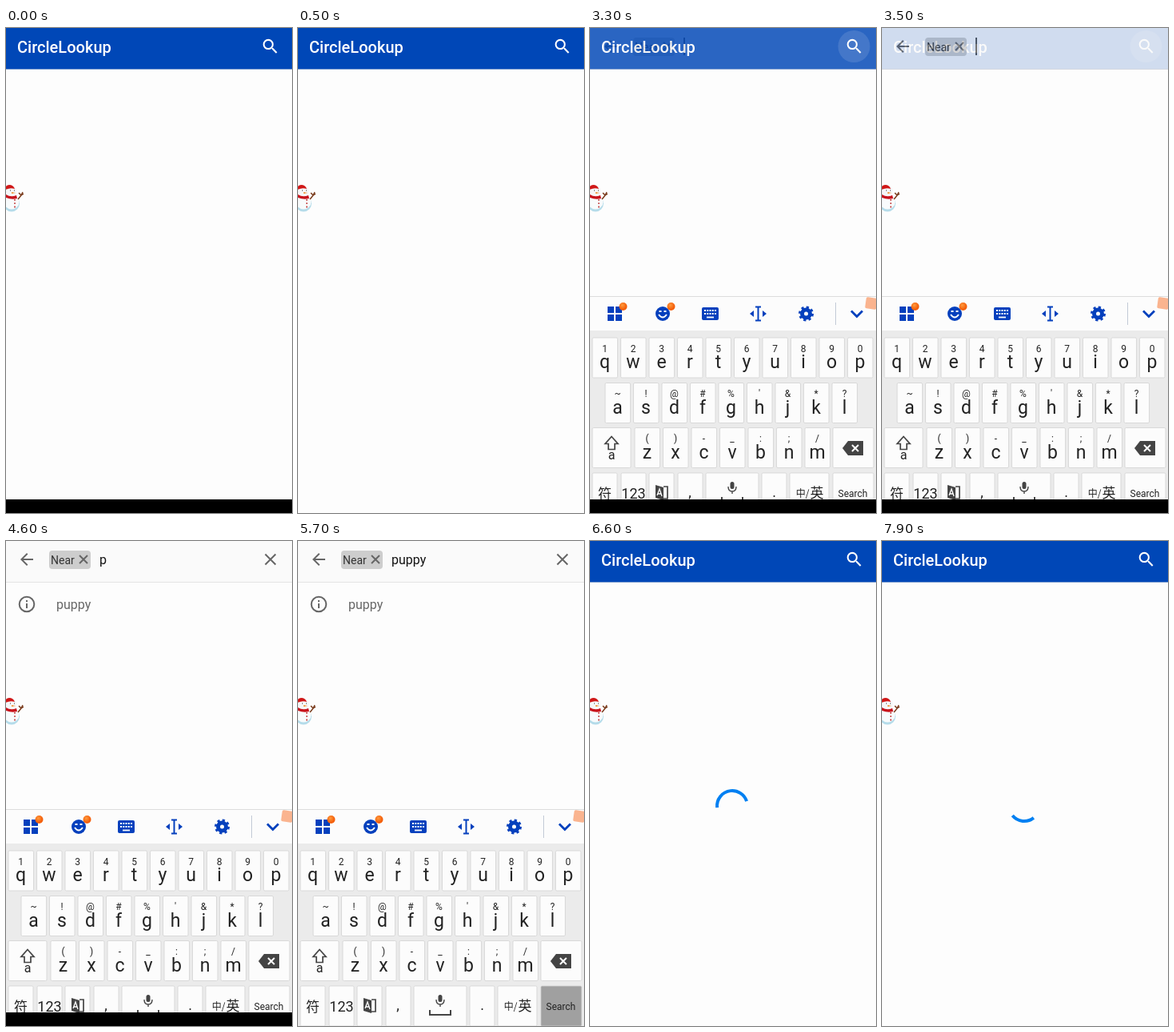
An HTML page for the animation above (8 s loop, 358 by 606 pixels).

```html
<!DOCTYPE html>
<html lang="en">
<head>
<meta charset="utf-8">
<title>Search demo</title>
<style>
  html, body { margin: 0; width: 100%; height: 100%; overflow: hidden; background: #fdfdfd; }
  svg { display: block; width: 100%; height: 100%; font-family: Roboto, "Noto Sans CJK SC", sans-serif; }
  #keys text { fill: #222; text-anchor: middle; }
  .line { fill: none; stroke: #666; stroke-width: 2; }
  .cjk { font-family: "Noto Sans CJK SC", "Noto Sans CJK", sans-serif; }
</style>
</head>
<body>
<svg viewBox="0 0 358 606">
  <defs>
    <radialGradient id="badge" cx=".4" cy=".35">
      <stop offset="0" stop-color="#ff9a3c"/><stop offset="1" stop-color="#f4600c"/>
    </radialGradient>
  </defs>
  <rect width="358" height="606" fill="#fdfdfd"/>
  <rect y="51" width="358" height="1" fill="#d4d8e0"/>

  <g id="titleBar">
    <rect width="358" height="51.400" fill="#0047b7"/>
    <text x="14" y="31" font-size="20" font-weight="500" fill="#fff">CircleLookup</text>
    <circle id="ripple" cx="330.5" cy="23" r="20" fill="#fff" opacity=".12"/>
    <path transform="translate(318.6 10.8) scale(1.02)" fill="#fff" d="M15.5 14h-.79l-.28-.27A6.47 6.47 0 0 0 16 9.5 6.5 6.5 0 1 0 9.5 16c1.61 0 3.09-.59 4.23-1.57l.27.28v.79l5 4.99L20.49 19zm-6 0a4.5 4.5 0 1 1 0-9 4.5 4.5 0 0 1 0 9z"/>
  </g>

  <g id="searchBar">
    <rect width="358" height="51" fill="#fafafa"/>
    <rect y="51" width="358" height="1" fill="#e4e4e4"/>
    <path transform="translate(14 11)" fill="#666" d="M20 11H7.83l5.59-5.59L12 4l-8 8 8 8 1.41-1.41L7.83 13H20z"/>
    <rect x="54" y="12" width="52" height="23" rx="4" fill="#cdcdcd"/>
    <text x="56" y="28.5" font-size="14" fill="#333">Near</text>
    <path class="line" d="M92 18l10 10m0-10l-10 10"/>
    <text id="query" x="117" y="29" font-size="16" fill="#111"></text>
    <path id="caret" d="M0 12v22" stroke="#222" stroke-width="1.5"/>
    <path id="clear" class="line" d="M324.500 16.500l13 13m0-13l-13 13"/>
  </g>

  <g id="hint">
    <circle class="line" cx="26" cy="79" r="9.300"/>
    <path class="line" d="M26 74v2m0 2v6"/>
    <text x="63" y="85" font-size="16" fill="#666">puppy</text>
  </g>

  <g id="snowman">
    <circle cx="7" cy="219.500" r="10" fill="#b5dcea"/>
    <circle cx="7" cy="217" r="9.500" fill="#f8fbfc"/>
    <circle cx="6" cy="204" r="7.500" fill="#f6f7f8"/>
    <path d="M-2 203Q-1 196 4 196 9 196 11 201 4 199-2 203z" fill="#d01818"/>
    <path d="M0 208q6 4 13 1l1 4q-7 2-14-1z" fill="#c8141c"/>
    <path d="M7 205l5 1-5 1z" fill="#f08a24"/>
    <path d="M5 203h1m4 0h1" stroke="#333" stroke-width="1.200"/>
    <path d="M15 214l4-5m-3-3l3 3 3-2m-3 2l2-4" fill="none" stroke="#7a3b1c" stroke-width="1.500"/>
    <path d="M11 214v11" stroke="#c03838" stroke-width="1.600" stroke-dasharray="1.800 2.500"/>
  </g>

  <circle id="spinner" cx="178" cy="331" r="19" pathLength="360" fill="none" stroke="#0080f2" stroke-width="4"/>

  <g id="keyboard">
    <rect y="335" width="358" height="1" fill="#ddd"/>
    <rect y="336" width="358" height="42" fill="#fcfcfc"/>
    <rect y="378" width="358" height="228" fill="#ebebeb"/>
    <g fill="#0540bd">
      <path d="M22 348h8v8h-8zm10 0h8v8h-8zm-10 10h8v8h-8zm10 0h8v8h-8z"/>
      <circle cx="91" cy="357" r="9"/>
      <rect x="140" y="349" width="21" height="16" rx="2"/>
      <path d="M200 357l5-4v8zm21 0l-5-4v8z"/>
      <circle cx="270.500" cy="357" r="5" fill="none" stroke="#0540bd" stroke-width="5"/>
      <circle cx="270.500" cy="357" r="8" fill="none" stroke="#0540bd" stroke-width="3" stroke-dasharray="3.142"/>
    </g>
    <g fill="none" stroke="#fff" stroke-width="1.800">
      <path d="M86.500 354h3m3 0h3M86 358q5 7 10 0"/>
      <path d="M143 353h15m-15 4h15" stroke-dasharray="2 1.250"/>
      <path d="M146 361.500h9"/>
    </g>
    <path d="M207 348.500h7m-3.500 0v17m-3.500 0h7" fill="none" stroke="#0540bd" stroke-width="2"/>
    <path d="M307.500 343v28" stroke="#c3cad6"/>
    <path d="M327 353.500l7 7 7-7" fill="none" stroke="#0540bd" stroke-width="2.800"/>
    <circle cx="41.500" cy="348" r="5" fill="url(#badge)"/>
    <circle cx="101.500" cy="348" r="5" fill="url(#badge)"/>
    <rect x="345" y="337" width="14" height="14" rx="2" fill="#fab48f" transform="rotate(8 352 344)"/>
    <g id="keys"></g>
    <g fill="none" stroke="#444" stroke-width="1.700">
      <path d="M27 510.500l8 9h-4v7h-8v-7h-4z"/>
      <path d="M316 525l7-9h19v18h-19z" fill="#444" stroke="none"/>
      <path d="M328 521l8 8m0-8l-8 8" stroke="#fff" stroke-width="2"/>
      <path d="M82 571l10 3v16l-10-3z" fill="#444" stroke="none"/>
      <path d="M92 573h5v15h-5"/>
      <path d="M84 584l3-8 3 9m-5-3h4" stroke="#fff" stroke-width="1.300"/>
      <rect x="175.500" y="567" width="5" height="9" rx="2.500" fill="#444" stroke="none"/>
      <path d="M173 573q0 6 5 6t5-6m-5 6v3" stroke-width="1.400"/>
      <path d="M165 586v6h26v-6" stroke-width="2"/>
    </g>
  </g>
  <rect id="navBar" y="589" width="358" height="17"/>
</svg>
<script>
const $ = id => document.getElementById(id);
const clamp = v => Math.min(1, Math.max(0, v));

const cap = (x, y, w, id = '') =>
  `<rect ${id} x="${x}" y="${y}" width="${w}" height="50" rx="1.500" fill="#fcfcfc" stroke="#d2d2d2" stroke-width=".8"/>`;
const label = (x, y, size, text, cls = '') =>
  `<text class="${cls}" x="${x}" y="${y}" font-size="${size}">${text.replace('&', '&amp;')}</text>`;

function letters(x, y, main, upper) {
  return [...main].map((c, i) => {
    const left = x + i * 35.5, mid = left + 15.5;
    return cap(left, y, 31.5) + label(mid, y + 17.5, 12, upper[i]) + label(mid, y + 38, 23, c);
  }).join('');
}

$('keys').innerHTML =
  letters(3, 387, 'qwertyuiop', '1234567890') +
  letters(19, 443.500, 'asdfghjkl', "~!@#%'&*?") +
  letters(56, 499.500, 'zxcvbnm', '()-_:;/') +
  cap(3, 499.500, 48) + cap(304, 499.500, 51) + label(27, 539, 16, 'a') +
  [[3, 31], [39, 31], [74, 31], [110, 31], [145, 66], [215, 31], [250, 49]]
    .map(([x, w]) => cap(x, 556, w)).join('') +
  cap(304, 556, 51, 'id="enter"') +
  label(18.500, 588, 17, '符', 'cjk') + label(54.500, 588, 18, '123') +
  label(125, 586, 18, ',') + label(230.500, 586, 18, '.') +
  label(266, 586, 12, '中/', 'cjk') + label(284, 587, 17, '英', 'cjk') +
  label(329, 585.500, 12, 'Search');

// Eased progress that finishes at half of the cycle
function ease(x) {
  if (x <= 0 || x >= .5) return x > 0 ? 1 : 0;
  let lo = 0, hi = 1, u;
  for (let i = 0; i < 24; i++) {
    u = (lo + hi) / 2;
    const v = 1 - u;
    if (.6 * v * v * u + .3 * v * u * u + .5 * u ** 3 < x) lo = u; else hi = u;
  }
  return u * u * (3 - 2 * u);
}

function spin(t) {
  const turns = (t - 5803) / 1223, p = turns % 1;
  const tail = ease(p - .5), sweep = 270 * (ease(p) - tail);
  const angle = -80.5 + 90 * p + 270 * tail + 144 * turns;
  $('spinner').setAttribute('stroke-dasharray', `${sweep} ${360 - sweep}`);
  $('spinner').setAttribute('transform', `rotate(${angle} 178 331)`);
}

function draw(t) {
  const within = (a, b) => t >= a && t < b;
  const show = (id, on) => { $(id).style.display = on ? '' : 'none'; };

  show('navBar', t < 500 || within(2300, 5000));
  show('ripple', within(3300, 3600));

  const fade = t < 3300 ? 0 : t < 5000 ? clamp((t - 3250) / 300) : clamp((6100 - t) / 350);
  $('searchBar').style.opacity = fade;

  $('query').textContent = t < 4100 ? '' : t < 5000 ? 'p' : 'puppy';
  show('clear', t >= 4100);
  show('caret', t < 4600);
  $('caret').setAttribute('transform', `translate(${t < 4100 ? 118 : 126.5})`);
  show('hint', within(4100, 5800));

  show('keyboard', within(3300, 6000));
  $('keyboard').setAttribute('transform', `translate(0 ${271 * clamp((t - 5700) / 300) ** 2})`);
  $('enter').setAttribute('fill', t >= 5600 ? '#a0a0a0' : '#fcfcfc');

  show('spinner', t > 5803);
  if (t > 5803) spin(t);
}

function tick(now) {
  draw(Math.floor(now % 8000 / 100) * 100);
  requestAnimationFrame(tick);
}
draw(0);
requestAnimationFrame(tick);
</script>
</body>
</html>
```
